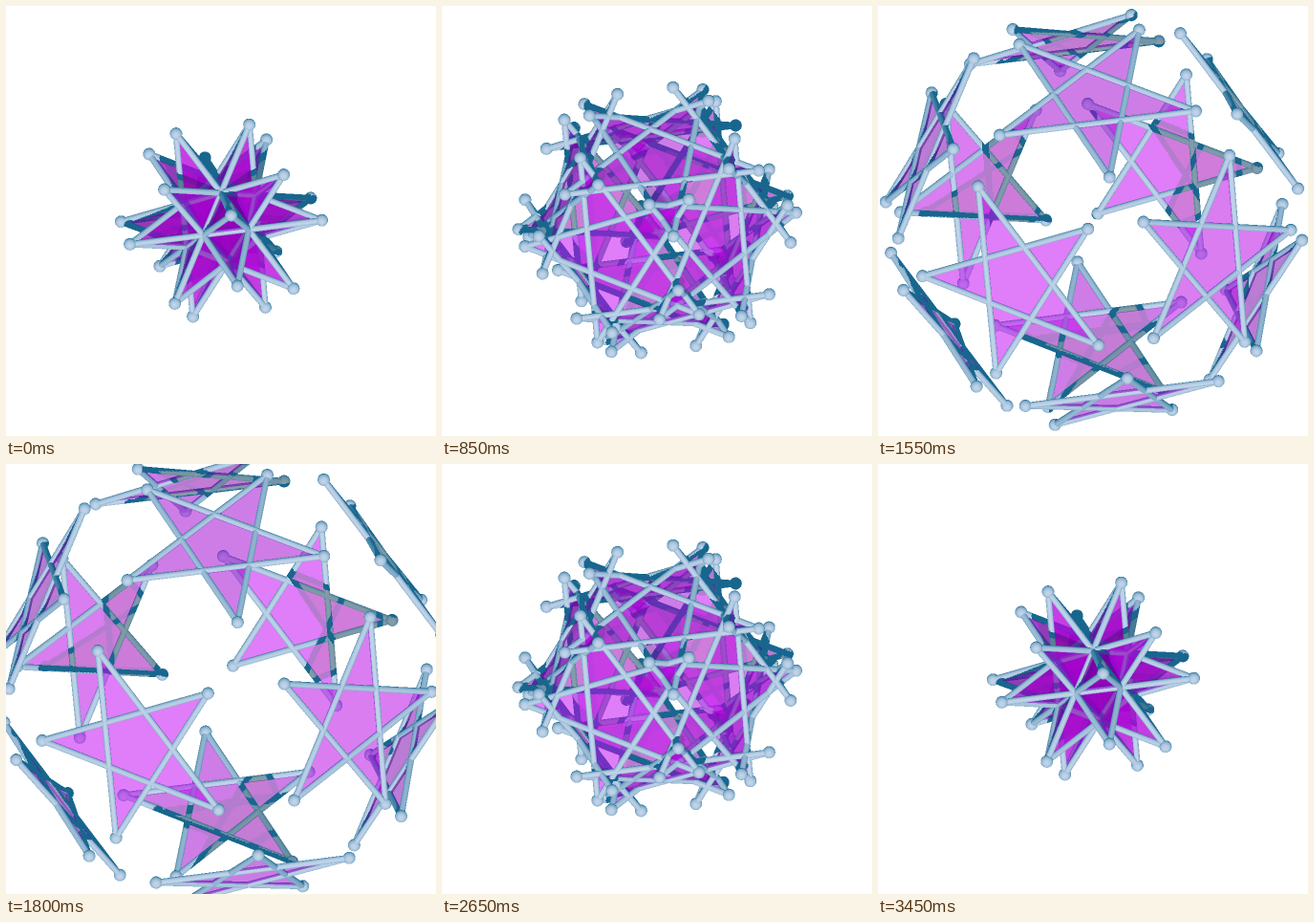
An HTML page with a canvas that plays this animation: 450 px wide and 450 px high, repeating every 3500 ms.

```html
<!DOCTYPE html>
<html>
<head>
<meta charset="utf-8">
<style>
html, body { margin: 0; width: 100%; height: 100%; overflow: hidden; background: #fff; }
canvas { display: block; }
</style>
</head>
<body>
<canvas id="stage" width="450" height="450"></canvas>
<script>
const PHI = (1 + Math.sqrt(5)) / 2;
const FRAME_MS = 50, FRAMES = 70, HOLD = 5, STEP = 0.1064;
const TUBE = 0.052, BALL = 0.103, EYE = 100, EMPTY = -99, BIAS = 0.07;
const AXES = [[0.457, 0.4666, -0.7575], [-0.68, 0.7325, 0.041], [0.574, 0.4964, 0.6515]];
const LIGHT = [-0.01, -0.295, 1], LIGHT_LEN = Math.hypot(...LIGHT);
const ROD = { ambient: [24, 102, 142], diffuse: [170, 110, 92] };
const FACE = { ambient: [110, 3, 160], diffuse: [93, 2, 88], alpha: 0.52 };
const FACE_SHADOW = [0.65, 0.5, 0.3];

const dot = (a, b) => a[0] * b[0] + a[1] * b[1] + a[2] * b[2];
const distance = (a, b) => Math.hypot(a[0] - b[0], a[1] - b[1], a[2] - b[2]);
const rotate = p => AXES.map(axis => dot(axis, p));

// Dodecahedron corners and face normals; each pentagram joins five corners of one layer.
const corners = [], normals = [];
for (const a of [-1, 1]) for (const b of [-1, 1]) {
  const s = a / PHI, l = b * PHI;
  corners.push([a, b, 1], [a, b, -1], [0, s, l], [l, 0, s], [s, l, 0]);
  normals.push([a, 0, l], [l, a, 0], [0, l, a]);
}
const stars = normals.map(n => {
  const points = corners.filter(v => Math.abs(dot(n, v) - 1 / PHI) < 0.01);
  const edges = [];
  points.forEach((p, i) => points.forEach((q, j) => {
    if (i < j && distance(p, q) > 3) edges.push([i, j]);
  }));
  const size = Math.hypot(...n), normal = n.map(c => c / size);
  return { points, edges, normal, lambert: Math.abs(dot(rotate(normal), LIGHT)) / LIGHT_LEN };
});

function project(p) {
  const [x, y, z] = rotate(p), k = EYE / (EYE - z);
  return [x * k, y * k, z];
}
const lean = ([x, y, z]) => [x - z * LIGHT[0], y - z * LIGHT[1], z];

// Flat view of one pentagram: its five lines, its depth plane and its bounds.
function flatten(points, { edges, lambert }) {
  const mid = [0, 1].map(k => points.reduce((sum, p) => sum + p[k], 0) / 5);
  const lines = edges.map(([i, j]) => {
    const [p, q] = [points[i], points[j]];
    const a = p[1] - q[1], b = q[0] - p[0], c = -a * p[0] - b * p[1];
    const sign = a * mid[0] + b * mid[1] + c < 0 ? -1 : 1;
    return [a * sign, b * sign, c * sign];
  });
  const [o, p, q] = points;
  const u = p.map((c, k) => c - o[k]), v = q.map((c, k) => c - o[k]);
  const nz = u[0] * v[1] - u[1] * v[0] || 1e-9;
  const gx = (u[2] * v[1] - u[1] * v[2]) / nz, gy = (u[0] * v[2] - u[2] * v[0]) / nz;
  const xs = points.map(p => p[0]), ys = points.map(p => p[1]);
  return {
    points, edges, lambert, lines, gx, gy, g0: o[2] - gx * o[0] - gy * o[1], z: 0,
    x0: Math.min(...xs), x1: Math.max(...xs), y0: Math.min(...ys), y1: Math.max(...ys)
  };
}

function faceDepth(s, x, y) {
  if (x < s.x0 || x > s.x1 || y < s.y0 || y > s.y1) return EMPTY;
  let misses = 0;
  for (const l of s.lines) if (l[0] * x + l[1] * y + l[2] < 0 && ++misses > 1) return EMPTY;
  return s.gx * x + s.gy * y + s.g0;
}

const makeGrid = (n, scale) => ({
  n, scale, half: n / scale / 2, depth: new Float32Array(n * n), lambert: new Float32Array(n * n)
});

function scan(g, x0, x1, y0, y1, visit) {
  const { n, scale, half } = g;
  const left = Math.max(0, Math.floor((x0 + half) * scale));
  const right = Math.min(n - 1, Math.floor((x1 + half) * scale));
  const top = Math.max(0, Math.floor((half - y1) * scale));
  const bottom = Math.min(n - 1, Math.floor((half - y0) * scale));
  for (let j = top; j <= bottom; j++) {
    const y = half - (j + 0.5) / scale;
    for (let i = left; i <= right; i++) visit((i + 0.5) / scale - half, y, j * n + i);
  }
}

function plot(g, at, z, nx, ny, nz, radius) {
  if (z <= g.depth[at]) return;
  g.depth[at] = z;
  g.lambert[at] = Math.max(0, nx * LIGHT[0] + ny * LIGHT[1] + nz * LIGHT[2]) / radius / LIGHT_LEN;
}

function drawTube(g, a, b) {
  const dx = b[0] - a[0], dy = b[1] - a[1], length = distance(a, b);
  const flat = Math.hypot(dx, dy) || 1e-6;
  const ux = dx / flat, uy = dy / flat, uz = (b[2] - a[2]) / length, c = flat / length;
  scan(g, Math.min(a[0], b[0]) - TUBE, Math.max(a[0], b[0]) + TUBE,
    Math.min(a[1], b[1]) - TUBE, Math.max(a[1], b[1]) + TUBE, (x, y, at) => {
      const rx = x - a[0], ry = y - a[1], e = ry * ux - rx * uy;
      if (e > TUBE || e < -TUBE) return;
      const h = Math.sqrt(TUBE * TUBE - e * e);
      const along = (rx * ux + ry * uy + h * uz) / c;
      if (along < 0 || along > length) return;
      plot(g, at, a[2] + along * uz + h * c,
        -uy * e - ux * uz * h, ux * e - uy * uz * h, c * h, TUBE);
    });
}

function drawBall(g, [cx, cy, cz]) {
  scan(g, cx - BALL, cx + BALL, cy - BALL, cy + BALL, (x, y, at) => {
    const rx = x - cx, ry = y - cy, h2 = BALL * BALL - rx * rx - ry * ry;
    if (h2 > 0) plot(g, at, cz + Math.sqrt(h2), rx, ry, Math.sqrt(h2), BALL);
  });
}

function drawSolids(g, shapes) {
  g.depth.fill(EMPTY);
  for (const { points, edges } of shapes) {
    for (const [i, j] of edges) drawTube(g, points[i], points[j]);
    for (const p of points) drawBall(g, p);
  }
}

const camera = makeGrid(900, 125), lamp = makeGrid(640, 64);
const large = document.createElement("canvas");
large.width = large.height = camera.n;
const largeCtx = large.getContext("2d");
const image = largeCtx.createImageData(camera.n, camera.n);

function render(offset) {
  const placed = stars.map(s => s.points.map(p => project(p.map((c, k) => c + s.normal[k] * offset))));
  const seen = placed.map((points, i) => flatten(points, stars[i]));
  const lit = placed.map((points, i) => flatten(points.map(lean), stars[i]));
  drawSolids(camera, seen);
  drawSolids(lamp, lit);

  // Number of faces between a point and the light, or Infinity behind a rod.
  const shadowsAt = (x, y, z) => {
    const lx = x - z * LIGHT[0], ly = y - z * LIGHT[1];
    const i = Math.floor((lx + lamp.half) * lamp.scale), j = Math.floor((lamp.half - ly) * lamp.scale);
    if (lamp.depth[j * lamp.n + i] > z + BIAS) return Infinity;
    let count = 0;
    for (const s of lit) if (faceDepth(s, lx, ly) > z + BIAS) count++;
    return count;
  };

  const { data } = image, { half, depth, lambert } = camera;
  const paint = (at, { ambient, diffuse, alpha = 1 }, light, shadows) => {
    for (let k = 0; k < 3; k++) {
      const colour = ambient[k] + diffuse[k] * light * FACE_SHADOW[k] ** shadows;
      data[at * 4 + k] += (colour - data[at * 4 + k]) * alpha;
    }
  };
  const layers = [];
  data.fill(255);
  scan(camera, -half, half, -half, half, (x, y, at) => {
    if (depth[at] !== EMPTY) paint(at, ROD, lambert[at] ** 0.6, shadowsAt(x, y, depth[at]));
    layers.length = 0;
    for (const s of seen) {
      s.z = faceDepth(s, x, y);
      if (s.z !== EMPTY && s.z > depth[at]) layers.push(s);
    }
    if (layers.length > 1) layers.sort((a, b) => a.z - b.z);
    for (const s of layers) paint(at, FACE, s.lambert, shadowsAt(x, y, s.z));
  });
  largeCtx.putImageData(image, 0, 0);

  const picture = document.createElement("canvas");
  picture.width = picture.height = 450;
  picture.getContext("2d").drawImage(large, 0, 0, 450, 450);
  return picture;
}

const ctx = document.getElementById("stage").getContext("2d");
const pictures = [];
let shown = -1;

function tick() {
  const frame = Math.floor(performance.now() / FRAME_MS) % FRAMES;
  const step = Math.max(0, Math.min(frame, FRAMES - frame) - HOLD);
  if (step !== shown) {
    pictures[step] = pictures[step] || render(step * STEP);
    ctx.clearRect(0, 0, 450, 450);
    ctx.drawImage(pictures[step], 0, 0);
    shown = step;
  }
  requestAnimationFrame(tick);
}
tick();
</script>
</body>
</html>
```
